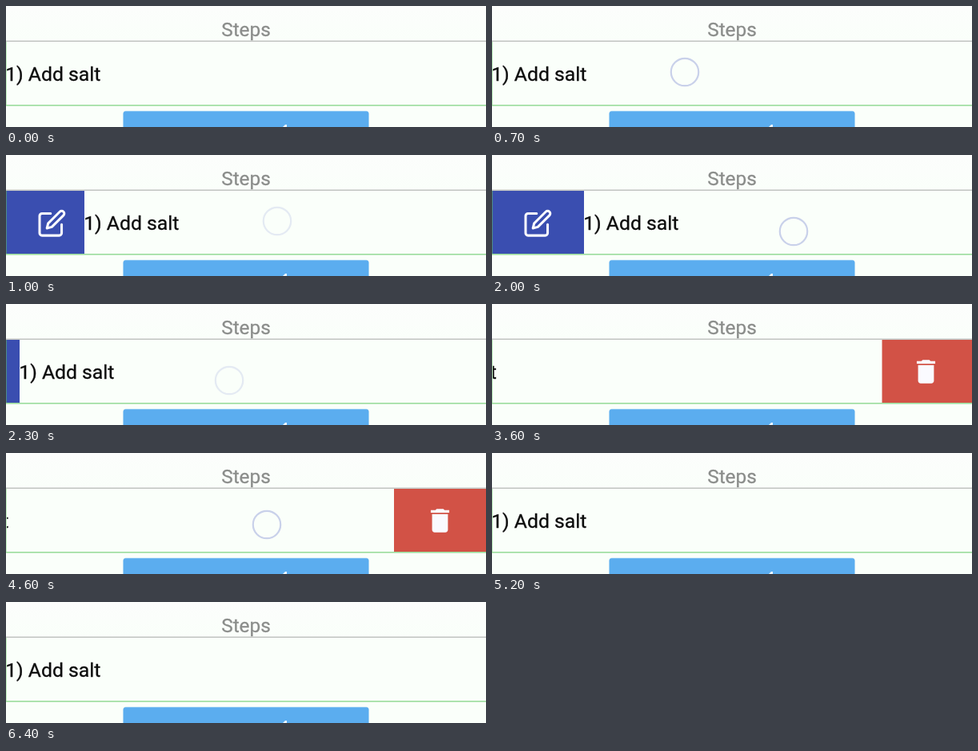
Recreate the animation shown at these times as an HTML page with a canvas. Size 600 px wide and 152 px high, loop 6500 ms.

```html
<!DOCTYPE html>
<html lang="en">
<head>
<meta charset="utf-8">
<title>Swipe row</title>
<style>
  html, body { margin: 0; width: 100%; height: 100%; overflow: hidden; background: #fafff9; }
  canvas { display: block; }
</style>
</head>
<body>
<canvas id="stage" width="600" height="152"></canvas>
<script>
const ctx = document.getElementById('stage').getContext('2d');
const LOOP = 6500, STEP = 100;
const WIDTH = 600, HEIGHT = 152;
const ROW_TOP = 45, ROW_BOTTOM = 124, ROW_HEIGHT = ROW_BOTTOM - ROW_TOP;
const OPEN = 115, SWIPE_TIME = 600, TOUCH_TIME = 400, FADE_TIME = 220;

// The finger keeps a fixed distance (grip) from the row's left edge.
const swipes = [
  { start: 700, from: 0, to: OPEN, grip: 241, y: 83 },
  { start: 2000, from: OPEN, to: 0, grip: 262, y: 96 },
  { start: 3200, from: 0, to: -OPEN, grip: 400, y: 88 },
  { start: 4600, from: -OPEN, to: 0, grip: 441, y: 90 }
];

const editIcon = new Path2D(
  'M11 4H4a2 2 0 0 0-2 2v14a2 2 0 0 0 2 2h14a2 2 0 0 0 2-2v-7' +
  'M18.5 2.5a2.12 2.12 0 0 1 3 3L12 15l-4 1 1-4z');
const trashIcon = new Path2D(
  'M6 19c0 1.1.9 2 2 2h8c1.1 0 2-.9 2-2V7H6zM19 4h-3.5l-1-1h-5l-1 1H5v2h14z');

const clamp = v => Math.min(1, Math.max(0, v));

// Quick start, long settling tail.
const ease = u => 1 - Math.pow(1 - u * u, 6.64);

function rowX(t) {
  const swipe = swipes.findLast(s => t >= s.start);
  if (!swipe) return 0;
  const u = clamp((t - swipe.start) / SWIPE_TIME);
  return swipe.from + (swipe.to - swipe.from) * ease(u);
}

function rect(color, x, y, w, h) {
  ctx.fillStyle = color;
  ctx.fillRect(x, y, w, h);
}

function text(label, x, y, size, color, align) {
  ctx.font = `${size}px Roboto, sans-serif`;
  ctx.fillStyle = ctx.strokeStyle = color;
  ctx.lineWidth = 0.3;
  ctx.textAlign = align;
  ctx.fillText(label, x, y);
  ctx.strokeText(label, x, y);
}

function icon(path, cx, cy, scale, outlined) {
  ctx.save();
  ctx.translate(cx, cy);
  ctx.scale(scale, scale);
  ctx.translate(-12, -12);
  ctx.lineWidth = 2;
  ctx.lineCap = ctx.lineJoin = 'round';
  ctx.strokeStyle = ctx.fillStyle = '#fafaff';
  if (outlined) ctx.stroke(path);
  else ctx.fill(path);
  ctx.restore();
}

function drawAction(color, x, width, drawIcon) {
  ctx.save();
  ctx.beginPath();
  ctx.rect(x, ROW_TOP, width, ROW_HEIGHT);
  ctx.clip();
  rect(color, x, ROW_TOP, width, ROW_HEIGHT);
  drawIcon();
  ctx.restore();
}

function drawRow(x) {
  rect('#fafffa', 0, ROW_TOP, WIDTH, ROW_HEIGHT);
  if (x > 0) drawAction('#3a4eb0', 0, x, () => icon(editIcon, 57.3, 85.8, 1.53, true));
  if (x < 0) drawAction('#d25246', WIDTH + x, -x, () => icon(trashIcon, 542.5, 85, 1.65, false));
  text('1) Add salt', x - 0.8, 94.3, 24.75, '#0c0c0c', 'left');
  rect('#c4c6c4', 0, 43.4, WIDTH, 1.6);
  rect('#9bdd9c', 0, ROW_BOTTOM, WIDTH, 1.6);
  rect(x > 0 ? '#4d8a8a' : '#c0efc0', 0, ROW_TOP, 1, ROW_HEIGHT);
}

function drawButton() {
  ctx.fillStyle = '#5badef';
  ctx.strokeStyle = 'rgba(91, 173, 239, 0.4)';
  ctx.lineWidth = 1;
  ctx.beginPath();
  ctx.roundRect(146.7, 132.2, 306.6, 40, 3);
  ctx.fill();
  ctx.stroke();
  ctx.fillStyle = '#eef7ff';
  ctx.beginPath();
  ctx.moveTo(346, HEIGHT);
  ctx.lineTo(349, 149);
  ctx.lineTo(351, 149);
  ctx.lineTo(351, HEIGHT);
  ctx.fill();
}

function drawTouch(x, y, opacity) {
  ctx.save();
  ctx.globalAlpha = opacity;
  ctx.lineWidth = 2.2;
  ctx.strokeStyle = '#c9d1ea';
  ctx.beginPath();
  ctx.arc(x, y, 17.2, 0, Math.PI * 2);
  ctx.stroke();
  ctx.restore();
}

function drawPage() {
  const shade = ctx.createLinearGradient(0, 0, 0, ROW_TOP);
  shade.addColorStop(0, '#fcfdfc');
  shade.addColorStop(1, '#fafffa');
  rect(shade, 0, 0, WIDTH, HEIGHT);
  text('Steps', 300, 37.6, 24.4, '#8b8d8b', 'center');
}

function draw(t) {
  const x = rowX(t);
  drawPage();
  drawRow(x);
  drawButton();
  for (const { start, grip, y } of swipes) {
    const age = t - start;
    if (age >= 0 && age < TOUCH_TIME) drawTouch(grip + x, y, clamp((TOUCH_TIME - age) / FADE_TIME));
  }
}

function tick() {
  const t = performance.now() % LOOP;
  draw(Math.floor(t / STEP) * STEP);
  requestAnimationFrame(tick);
}
tick();
</script>
</body>
</html>
```
